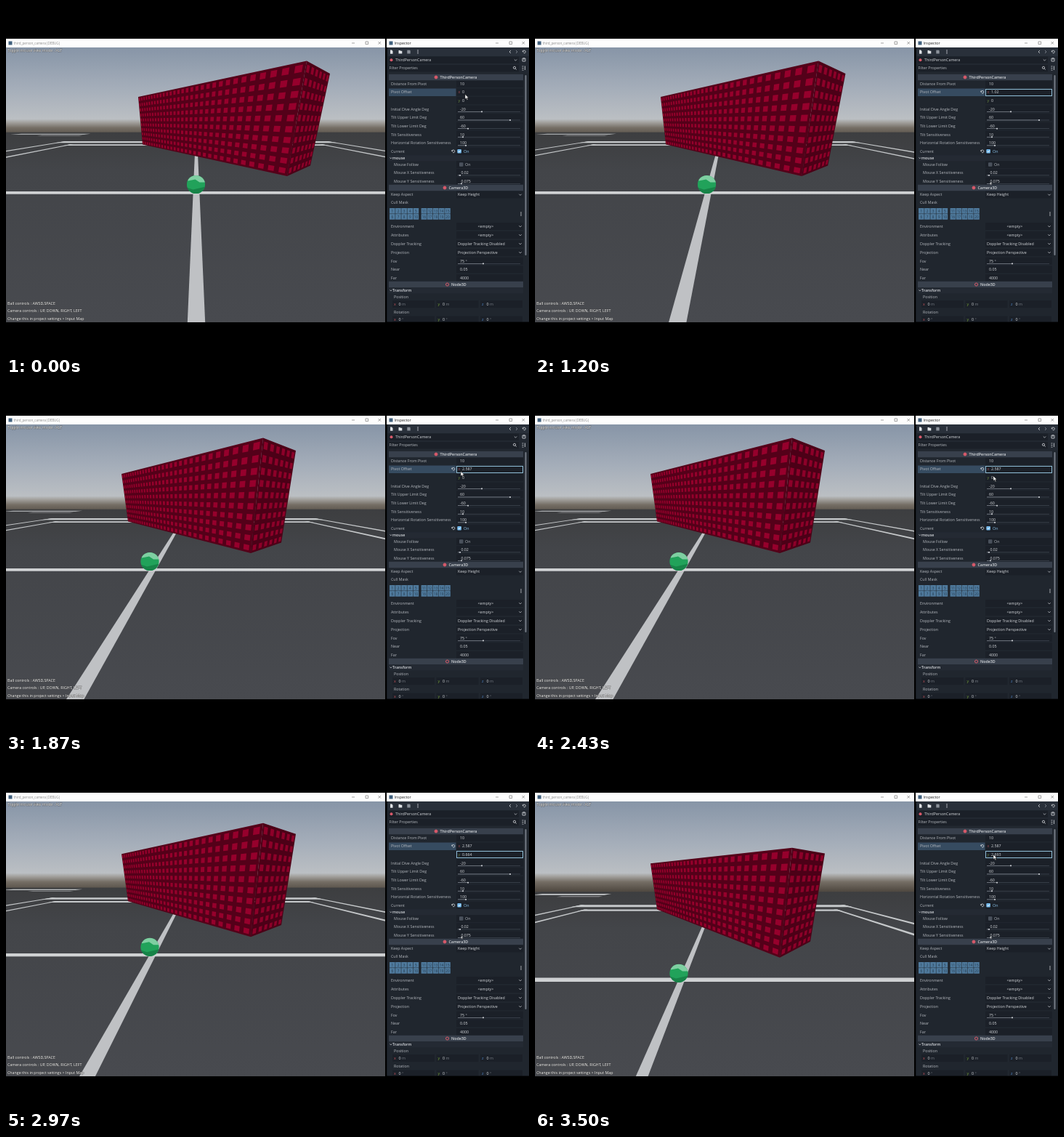
Write an HTML page with a canvas that moves like this. It is 720x480 px and loops after 3560 ms.

```html
<!DOCTYPE html>
<html lang="en">
<head>
<meta charset="utf-8">
<title>Third person camera</title>
<style>
  html, body { margin: 0; width: 100%; height: 100%; overflow: hidden; background: #000; }
  canvas { position: absolute; left: 0; top: 57px; }
  svg { position: absolute; left: 0; top: 0; }
  text { font: 5.3px "Open Sans", "Noto Sans", sans-serif; fill: #b4b8be; white-space: pre; }
  .bold { font-weight: 600; fill: #d6d9dd; }
  .bright { fill: #d3d6da; }
  .dark { fill: #222; }
  .pale { font-size: 4.5px; fill: #8a8a8a; }
  .hud { fill: #fff; stroke: #333; stroke-width: .4px; paint-order: stroke; }
  .mask { font-size: 4.6px; fill: #22364a; text-anchor: middle; }
</style>
</head>
<body>
<canvas id="scene" width="522" height="378"></canvas>
<svg id="ui" width="720" height="480" viewBox="0 0 720 480"></svg>
<script>
const LOOP = 3560;
const HORIZON = 157, CENTER = 262, V_RATIO = 0.755;
const ctx = document.getElementById('scene').getContext('2d');
const ui = document.getElementById('ui');

/* ---------- interface ---------- */
function add(tag, attrs, content) {
  const el = document.createElementNS('http://www.w3.org/2000/svg', tag);
  for (const key in attrs) el.setAttribute(key, attrs[key]);
  if (content !== undefined) el.textContent = content;
  ui.appendChild(el);
  return el;
}
const rect = (x, y, width, height, fill, more) => add('rect', { x, y, width, height, fill, ...more });
const text = (x, cy, s, cls = '') => add('text', { x, y: cy + 1.9, class: cls }, s);
const path = (d, stroke = '#c3c7cc', width = 0.8, fill = 'none') =>
  add('path', { d, stroke, fill, 'stroke-width': width });
const dot = (cx, cy, r, fill) => add('circle', { cx, cy, r, fill });
const chevron = (x, y) => path(`M${x - 1.7} ${y - 0.8}l1.7 1.7l1.7 -1.7`);
const kebab = (x, y) => [-2, 0, 2].forEach(d => dot(x, y + d, 0.7, '#d3d6da'));
const revert = (x, y) => path(`M${x - 1.7} ${y - 1.6}v1.6h1.6M${x - 1.5} ${y - 0.3}a1.9 1.9 0 1 1 1.2 2.1`, '#d3d6da');

function titleBar(x, width, title, cls) {
  rect(x, 45, width, 12, '#fdfdfd');
  rect(x + 3.5, 48.5, 5, 5, '#3f5f7c');
  text(x + 10.5, 50.9, title, cls);
  const r = x + width;
  path(`M${r - 46} 51h4M${r - 27} 49h3.6v3.6h-3.6zM${r - 9.5} 49l3.6 3.6m0 -3.6l-3.6 3.6`, '#666', 0.6);
}

function slider(y, grab) {
  rect(622, y + 3.3, 86, 0.7, '#434a55');
  rect(622, y + 3.3, grab - 622, 0.7, '#848a93');
  rect(grab - 0.8, y + 2.8, 1.7, 1.7, '#dfe2e6');
}

function property(y, label, value, grab, indent = 0) {
  text(530 + indent, y, label);
  rect(620, y - 5, 92, 10, '#1b2028');
  text(625, y, value, 'bright');
  if (grab) slider(y, grab);
}

function choice(y, label, value, empty) {
  text(530, y, label);
  rect(620, y - 5, 92, 10, '#1b2028');
  text(empty ? 649.5 : 622, y, value, 'bright');
  chevron(708, y);
}

function header(y, label, x, ring) {
  rect(527, y - 4.2, 185, 8.4, '#38404c');
  add('circle', { cx: x - 5.5, cy: y, r: 2, fill: ring ? 'none' : '#d8596a', stroke: '#d8596a', 'stroke-width': 1 });
  text(x, y, label, 'bold');
}

function section(y, label) {
  rect(527, y - 4, 185, 8, '#242a33');
  path(`M528.5 ${y - 0.8}l1.3 1.5l1.3 -1.5`);
  text(532, y, label, 'bold');
}

function vectorRow(y, unit) {
  [['x', '#c4525a'], ['y', '#79a53a'], ['z', '#4f83c4']].forEach(([axis, color], i) => {
    const x = 532 + i * 60.5;
    rect(x, y - 5, 58, 10, '#1b2028');
    text(x + 2, y, axis).style.fill = color;
    text(x + 8.5, y, '0', 'bright');
    text(x + 13, y, unit).style.fill = '#777d86';
  });
}

titleBar(0, 522, 'third_person_camera (DEBUG)', 'pale');
titleBar(524, 196, 'Inspector', 'dark');
text(2, 60.8, 'Toggle mouse view mode : ALT', 'hud');
text(2, 409, 'Ball controls : AWSD,SPACE', 'hud');
text(2, 419.5, 'Camera controls : UP, DOWN, RIGHT, LEFT', 'hud');
text(2, 430, 'Change this in project settings > Input Map', 'hud');

rect(524, 57, 196, 378, '#222831');
rect(524, 57, 196, 12, '#29303a');
rect(524, 57, 1.5, 378, '#151a21');
path('M529 60.5h2l1.5 1.5v3.8h-3.5z', 'none', 0, '#dfe2e6');
path('M540.5 61h2l.8 .8h2v3.6h-4.8z', 'none', 0, '#dfe2e6');
path('M552.3 60.8h3.6l.8 .8v4h-4.4z', 'none', 0, '#8b919a');
kebab(567, 63);
path('M695 61l-2 2l2 2', '#d3d6da');
path('M702 61l2 2l-2 2', '#8b919a');
revert(713, 63);
rect(527, 69.5, 179, 9.5, '#1b2028');
dot(530.5, 74.3, 2, '#d8596a');
text(536, 74.2, 'ThirdPersonCamera', 'bright');
chevron(701.5, 74.3);
path('M711 72h4v4h-4zM713 71v3', '#c3c7cc', 0.9);
rect(527, 81, 179, 9.5, '#1b2028');
text(527.5, 85.4, 'Filter Properties');
add('circle', { cx: 700, cy: 84.8, r: 1.6, fill: 'none', stroke: '#d3d6da', 'stroke-width': 0.8 });
path('M701.2 86l1.6 1.6', '#d3d6da');
path('M710.5 83h2M710.5 85.5h2M710.5 88h2M714.5 82.5v5.5', '#c3c7cc', 0.9);
rect(525, 92.5, 195, 342, '#20262e');

property(107, 'Distance From Pivot', '10');
rect(527, 113.5, 92.5, 10.5, '#364b60');
text(530, 118.3, 'Pivot Offset');
rect(620, 113.5, 92, 10, '#1b2028');
rect(620, 125, 92, 10, '#1b2028');
text(622.5, 118.3, 'x').style.fill = '#a24b54';
text(622.5, 130, 'y').style.fill = '#6b8a41';
property(141.7, 'Initial Dive Angle Deg', '-20', 655);
property(153.3, 'Tilt Upper Limit Deg', '60', 694);
property(165, 'Tilt Lower Limit Deg', '-60', 636);
property(176.6, 'Tilt Sensitiveness', '10', 629);
property(188.2, 'Horizontal Rotation Sensitiveness', '100', 633);
text(530, 199.8, 'Current');
rect(620, 194.8, 92, 10, '#1b2028');
revert(615.5, 199.8);
rect(621.3, 197, 5.6, 5.6, '#74b9ec', { rx: 1 });
path('M622.6 199.8l1.2 1.3l2 -2.4', '#fff', 0.9);
text(630, 199.8, 'On').style.fill = '#8fc6ee';
section(209.2, 'mouse');
text(534, 218, 'Mouse Follow');
rect(620, 213, 92, 10, '#1b2028');
rect(624, 215.3, 5.4, 5.4, '#4a515c', { rx: 1 });
text(632, 218, 'On');
property(229.2, 'Mouse X Sensitiveness', ' 0.02', 625, 4);
property(240.7, 'Mouse Y Sensitiveness', ' 0.075', 627, 4);
header(250, 'Camera3D', 609.5);
choice(259.5, 'Keep Aspect', 'Keep Height');
text(530, 270.3, 'Cull Mask');
for (let i = 0; i < 20; i++) {
  const col = i % 5 + (i % 10 >= 5 ? 5.35 : 0), row = i < 10 ? 0 : 1;
  rect(528 + col * 8.15, 278 + row * 8.1, 7.6, 7.6, '#4f7a9d');
  const number = i % 10 < 5 ? i % 5 + 1 + row * 5 : i % 5 + 11 + row * 5;
  text(531.8 + col * 8.15, 281.8 + row * 8.1, number, 'mask');
}
kebab(709, 286);
choice(303, 'Environment', '<empty>', true);
choice(315, 'Attributes', '<empty>', true);
choice(327, 'Doppler Tracking', 'Doppler Tracking Disabled');
choice(339, 'Projection', 'Projection Perspective');
property(350.7, 'Fov', '75 °', 657);
property(362.3, 'Near', '0.05');
property(374, 'Far', '4000');
header(383, 'Node3D', 613, true);
header(98, 'ThirdPersonCamera', 597.5);
section(391.3, 'Transform');
text(534, 399.6, 'Position');
vectorRow(410, 'm');
text(534, 421, 'Rotation');
vectorRow(431.5, '°');
rect(714.5, 95, 2, 248, '#747b85', { rx: 1 });
rect(524, 434.5, 196, 12, '#000');

const revertIcon = revert(615.5, 118.3);
const selection = rect(627, 126.5, 13, 7, '#6b7783');
const valueX = text(628, 118.3, '0', 'bright');
const valueY = text(628, 130, '0', 'bright');
const focus = rect(620.5, 114.5, 91, 9, 'none', { stroke: '#8fbdd6', 'stroke-width': 1 });
const ripple = add('circle', { cx: 631.5, cy: 130, r: 6, fill: 'none', stroke: '#4fb6a4', 'stroke-width': 1.2 });
const ARROW = 'M0 0v6.6l1.6 -1.4l1.2 2.6l1.1 -.5l-1.2 -2.5h2.1z';
const cursor = path(ARROW, '#111', 0.5, '#fff');
const heldCursor = path('M627 242l2.6 2.6h-1.6l.6 1.4l-.9 .2l-.6 -1.4l-1 .7z', '#222', 0.3, '#d0d3d7');

/* ---------- scene ---------- */
// s is the sideways shift of a point in pixels at full offset, so it grows as 1/depth.
let u = 0, v = 0;
const shift = ([x, y, s]) => [x - s * u, y + V_RATIO * s * v, s];
const ground = (x, s) => shift([CENTER + x * s, HORIZON + s / 0.6, s]);

function poly(points, fill) {
  ctx.beginPath();
  points.forEach(([x, y]) => ctx.lineTo(x, y));
  ctx.closePath();
  ctx.fillStyle = fill;
  ctx.fill();
}

const patch = (x0, x1, s0, s1, fill) =>
  poly([ground(x0, s0), ground(x1, s0), ground(x1, s1), ground(x0, s1)], fill);

function gradient(y0, y1, stops) {
  const g = ctx.createLinearGradient(0, y0, 0, y1);
  stops.forEach(([at, color]) => g.addColorStop(at, color));
  return g;
}

function face(corners, cols, rows, base, tile) {
  const quad = corners.map(shift);
  poly(quad, base);
  const [tl, tr, br, bl] = quad.map(([x, y, s]) => [x / s, y / s, 1 / s]);
  const at = (a, b) => {
    const [x, y, z] = tl.map((_, k) =>
      (1 - b) * ((1 - a) * tl[k] + a * tr[k]) + b * ((1 - a) * bl[k] + a * br[k]));
    return [x / z, y / z];
  };
  for (let i = 0; i < cols; i++) {
    for (let j = 0; j < rows; j++) {
      const a0 = (i + 0.22) / cols, a1 = (i + 0.78) / cols;
      const b0 = (j + 0.22) / rows, b1 = (j + 0.78) / rows;
      poly([at(a0, b0), at(a1, b0), at(a1, b1), at(a0, b1)], tile);
    }
  }
}

const FRONT_TOP = [414, 75.5, 60], FRONT_LOW = [387, 234, 50];
const FAR_TOP = [182, 125, 23], FAR_LOW = [188, 190.5, 20];
const SIDE_TOP = [446, 93, 47], SIDE_LOW = [419, 219.5, 40];

function drawBall() {
  const [x, y] = shift([261.5, 245.5, 63.5]);
  ctx.save();
  ctx.beginPath();
  ctx.arc(x, y, 12.6, 0, 7);
  ctx.clip();
  ctx.fillStyle = '#21a25a';
  ctx.fillRect(x - 13, y - 13, 26, 26);
  poly([[x - 13, y + 4], [x - 4, y + 7], [x + 13, y + 3], [x + 13, y + 13], [x - 13, y + 13]], '#178348');
  poly([[x - 13, y - 13], [x + 13, y - 13], [x + 13, y - 3], [x + 5, y - 3], [x - 1, y - 7], [x - 11, y - 5]], '#7fcfa2');
  ctx.restore();
}

function drawScene() {
  ctx.setTransform(1, 0, 0, 1, 0, -57);
  ctx.fillStyle = gradient(57, 180, [[0, '#8795a7'], [0.45, '#a4adb9'], [0.8, '#bbbfc3'],
    [0.84, '#a19f9b'], [0.9, '#746d64'], [1, '#514a42']]);
  ctx.fillRect(0, 57, 522, 378);

  const edge = ground(0, 10)[1];
  ctx.fillStyle = gradient(edge, 435, [[0, '#3d3e40'], [0.2, '#434549'], [1, '#484a4f']]);
  ctx.fillRect(0, edge, 522, 435 - edge);

  const paint = '#c6c9cb';
  patch(-21.5, -13, 11.2, 11.9, paint);
  patch(-17, -12.5, 12.5, 12.9, '#9b9d9f');
  patch(-10.4, 10.4, 17.4, 18.7, paint);
  patch(-8.7, 8.7, 20, 21, paint);
  for (const side of [-1, 1]) {
    patch(side * 10.4, side * 10.1, 17.4, 60, paint);
    patch(side * 8.7, side * 8.45, 20, 60, paint);
  }
  patch(-0.073, 0.073, 18, 200, '#bfc1c4');
  patch(-30, 30, 58.8, 61.1, '#cfd1d3');

  face([FRONT_TOP, SIDE_TOP, SIDE_LOW, FRONT_LOW], 6, 10, '#4c0017', '#8d0029');
  face([FAR_TOP, FRONT_TOP, FRONT_LOW, FAR_LOW], 30, 10, '#540019', '#96002c');
  drawBall();
}

/* ---------- motion ---------- */
const HOLDS = [0, 200, 400, 800, 1000, 1200, 1400, 1530, 1730];
const OFFSET_X = [[800, 0], [1000, 0.32], [1200, 1.02], [1400, 1.79], [1530, 2.111], [1730, 2.54], [1800, 2.587]];
const OFFSET_Y = [[2640, 0], [2700, 0.061], [2950, 0.6], [3200, 1.367], [3500, 2.693]];
const CURSOR_X = [[0, 632], [200, 631], [1800, 631], [1870, 626], [2250, 631]];
const CURSOR_Y = [[0, 121.5], [200, 119], [400, 117.5], [1800, 117.5], [1870, 121.5], [2250, 127.5], [3400, 130]];

function track(keys, t) {
  if (t <= keys[0][0]) return keys[0][1];
  for (let i = 1; i < keys.length; i++) {
    const [t0, a] = keys[i - 1], [t1, b] = keys[i];
    if (t < t1) return a + (b - a) * (t - t0) / (t1 - t0);
  }
  return keys[keys.length - 1][1];
}

const show = (el, on) => el.setAttribute('visibility', on ? 'visible' : 'hidden');
const format = n => String(+n.toFixed(3));

function render(time) {
  const t = time < 1730 ? HOLDS.filter(h => h <= time).pop() : Math.min(time, 3500);
  const x = track(OFFSET_X, t), y = track(OFFSET_Y, t);
  u = x / 2.587;
  v = y / 2.693;
  drawScene();

  valueX.textContent = format(x);
  valueY.textContent = format(y);
  show(revertIcon, x > 0);
  show(focus, t >= 800);
  focus.setAttribute('y', t < 2500 ? 114.5 : 125.5);
  show(ripple, t >= 2600 && t < 2780);
  show(selection, t >= 2600 && t < 2780);
  const dragging = (t >= 1000 && t < 1800) || (t >= 2640 && t < 3470);
  show(cursor, !dragging);
  show(heldCursor, dragging || t >= 3470);
  cursor.setAttribute('transform', `translate(${track(CURSOR_X, t)} ${track(CURSOR_Y, t)})`);
}

const start = performance.now();
function tick() {
  render((performance.now() - start) % LOOP);
  requestAnimationFrame(tick);
}
tick();
</script>
</body>
</html>
```
